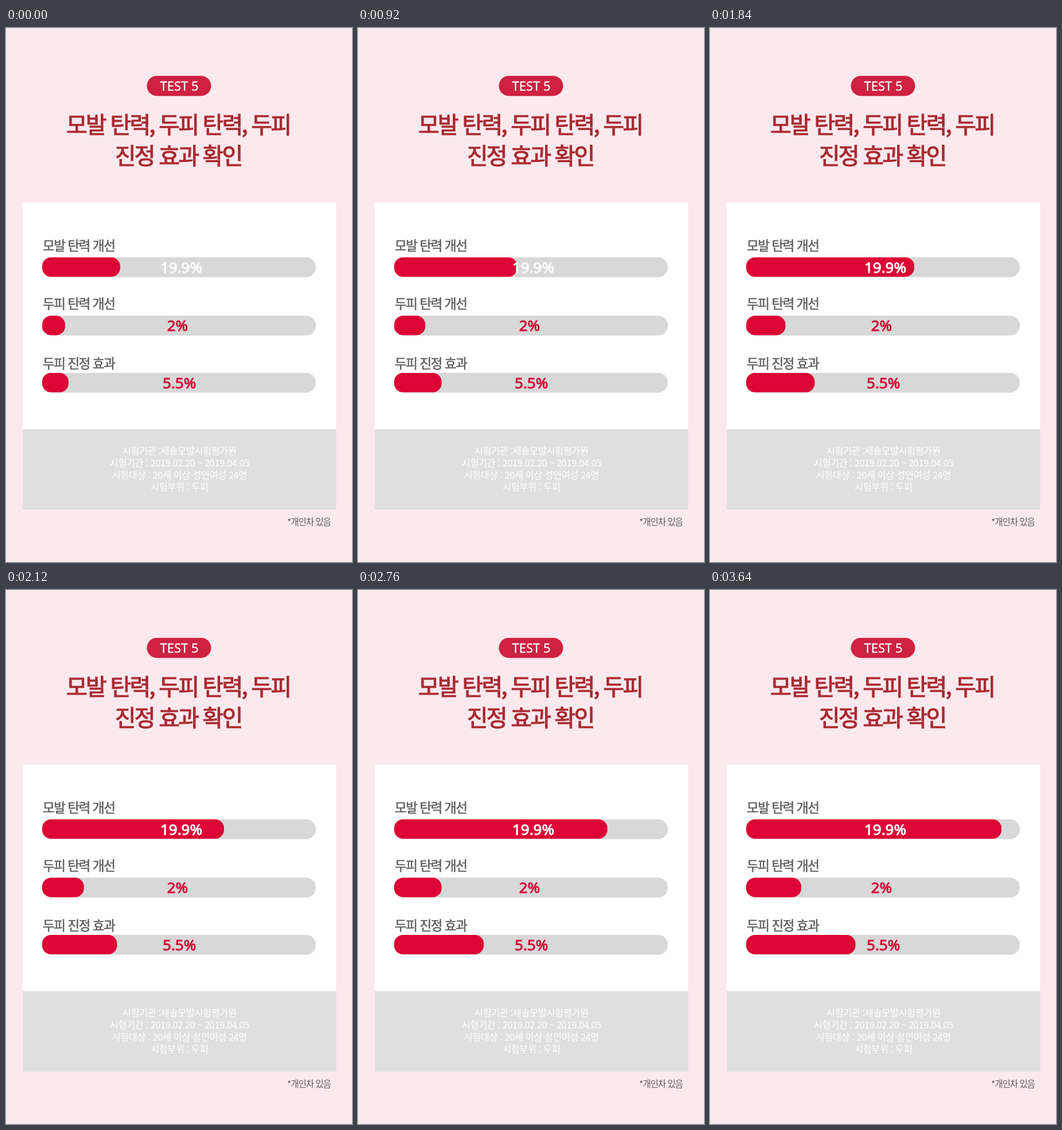
Recreate the animation shown at these times as an HTML page. Size 603 by 929 pixels, loop 5520 ms.

```html
<!DOCTYPE html>
<html lang="ko">
<head>
<meta charset="utf-8">
<title>TEST 5</title>
<style>
  html, body { margin: 0; width: 100%; height: 100%; overflow: hidden; background: #fbe9ee; }
  svg { display: block; width: 100%; height: 100%; }
  text { font-family: "Noto Sans CJK KR", "Noto Sans CJK", "Noto Sans CJK JP", sans-serif; }
  .mid { text-anchor: middle; }
  .badge, .value { font-family: "Noto Sans", "Open Sans", sans-serif; }
  /* thin strokes give a medium weight */
  .badge { font-size: 22px; fill: #fff; stroke: #fff; stroke-width: .3px; }
  .title { font-size: 40px; letter-spacing: -2.8px; fill: #a92a30; stroke: #a92a30; stroke-width: 1.1px; }
  .label { font-size: 22.5px; letter-spacing: -1.4px; fill: #626262; stroke: #626262; stroke-width: .6px; }
  .value { font-size: 26px; fill: #d20f38; stroke: #d20f38; stroke-width: 1px; }
  .light { fill: #fff; stroke: #fff; }
  .info { font-size: 16.5px; font-weight: 300; letter-spacing: -.5px; fill: #fff; }
  .note { font-size: 15.5px; font-weight: 300; letter-spacing: -1px; fill: #5f585b; }
</style>
</head>
<body>
<svg id="stage" viewBox="0 0 603 929">
  <rect width="603" height="929" fill="#fbe9ee"/>
  <rect x="245.5" y="83.2" width="112" height="35" rx="17.5" fill="#cf2141"/>
  <text class="badge mid" x="302" y="109">TEST 5</text>
  <text class="title mid" x="300.2" y="183">모발 탄력, 두피 탄력, 두피</text>
  <text class="title mid" x="300.2" y="236.5">진정 효과 확인</text>
  <rect x="29" y="304" width="546.5" height="394" fill="#fff"/>
  <rect x="29" y="698" width="546.5" height="140" fill="#dfdfdf"/>
  <g id="bars"></g>
  <text class="info mid" x="302.2" y="742">시험기관 :새솔모발시험평가원</text>
  <text class="info mid" x="302.2" y="763">시험기간 : 2019.02.20 ~ 2019.04.05</text>
  <text class="info mid" x="302.2" y="784">시험대상 : 20세 이상 성인여성 24명</text>
  <text class="info mid" x="302.2" y="805">시험부위 : 두피</text>
  <text class="note" x="490" y="864.5">*개인차 있음</text>
</svg>
<script>
const LOOP = 5520, GROW = 3620, STEP = 40;
const LEFT = 63, TRACK = 477, HEIGHT = 34.4;

const rows = [
  { label: "모발 탄력 개선", labelY: 386.5, y: 399, value: "19.9%", valueX: 305.5, tone: "light", from: 136, to: 445 },
  { label: "두피 탄력 개선", labelY: 488, y: 500.6, value: "2%", valueX: 299, tone: "", from: 40, to: 96 },
  { label: "두피 진정 효과", labelY: 592, y: 600, value: "5.5%", valueX: 302.2, tone: "", from: 46, to: 190.5 }
];

const group = document.getElementById("bars");

function add(name, attrs, content = "") {
  const node = document.createElementNS("http://www.w3.org/2000/svg", name);
  for (const key in attrs) node.setAttribute(key, attrs[key]);
  node.textContent = content;
  return group.appendChild(node);
}

for (const row of rows) {
  const box = { x: LEFT, y: row.y };
  add("text", { class: "label", x: 64, y: row.labelY }, row.label);
  add("rect", { ...box, width: TRACK, height: HEIGHT, rx: 17, fill: "#d8d8d8" });
  row.fill = add("rect", { ...box, width: row.from, height: HEIGHT - .6, rx: 15.5, fill: "#dd0535" });
  add("text", { class: `value mid ${row.tone}`, x: row.valueX, y: row.y + 26.7 }, row.value);
}

// Bars grow linearly in 40 ms steps, then hold until the loop restarts.
function draw(time) {
  const t = Math.floor((time % LOOP) / STEP) * STEP;
  const p = Math.min(t / GROW, 1);
  for (const { fill, from, to } of rows) fill.setAttribute("width", from + (to - from) * p);
}

const start = performance.now();
function tick() {
  draw(performance.now() - start);
  requestAnimationFrame(tick);
}
tick();
</script>
</body>
</html>
```
